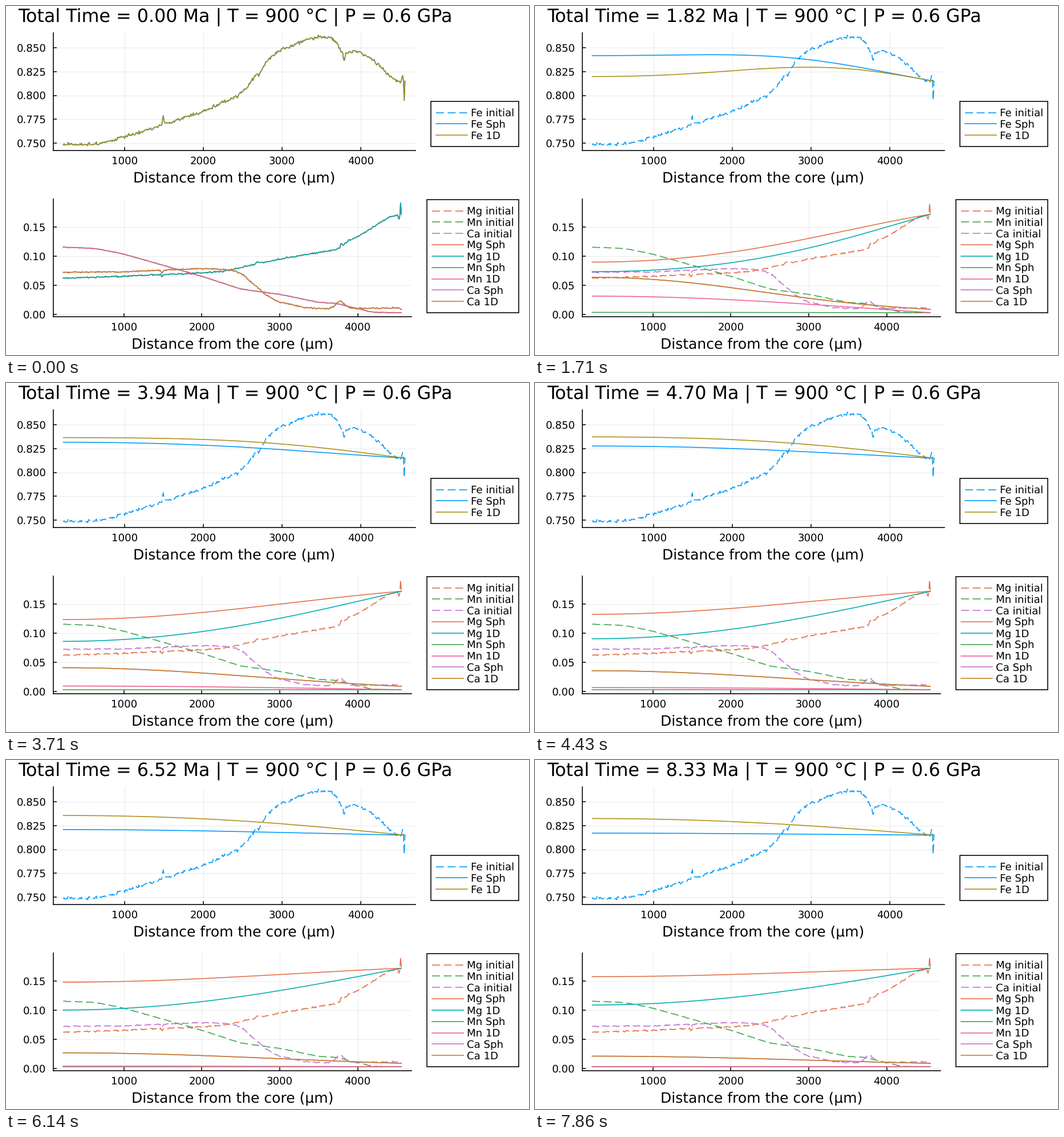
Recreate the animation shown at these times as a matplotlib script. Size 917x611 px, loop 8000 ms.

```python
import numpy as np
import matplotlib.pyplot as plt
from matplotlib.animation import FuncAnimation
from matplotlib.patches import Rectangle

plt.rcParams["text.hinting"] = "none"

W, H, DPI = 917, 611, 64
PX = 72 / DPI                      # points per pixel
STEPS, TICKS, LOOP = 56, 3, 8000   # model steps, ticks per step, ms
MA_PER_STEP = 15 / 99
LW = 1.6
DASH = (0, (14 / LW, 6.3 / LW))
UNIT = 2.269
SMALL, LABEL, TITLE = 8 * UNIT, 11 * UNIT, 14 * UNIT

BLUE, ORANGE, GREEN, PURPLE = "#009afa", "#e36f47", "#3ea44e", "#c371d2"
OCHRE, TEAL, PINK, BROWN = "#ac8e18", "#00aaae", "#ed5e93", "#c68225"

# ---- starting composition along the traverse (µm) ----
X0, X1 = 221, 4561


def trend(x, *keys):
    """Rounded polyline through a few (distance, fraction) keys."""
    return np.mean([np.interp(x + d, *zip(*keys))
                    for d in np.linspace(-60, 60, 9)], axis=0)


def bump(x, center, width, height):
    return height * np.exp(-((x - center) / width) ** 2 / 2)


def profile(x):
    """Columns Mg, Mn, Ca; Fe is the remainder to one."""
    mg = trend(x, (X0, .063), (1000, .066), (2000, .072), (2300, .075),
               (3000, .0955), (3760, .1125), (3860, .126), (4000, .1335),
               (4400, .1675), (X1, .172))
    mn = trend(x, (X0, .116), (650, .1135), (1000, .104), (2000, .066),
               (2500, .044), (3000, .035), (3500, .021), (3720, .0195),
               (4200, .004), (X1, .0034))
    ca = trend(x, (X0, .073), (1000, .0735), (2000, .0795), (2350, .077),
               (2500, .072), (2800, .0365), (2950, .0235), (3300, .0125),
               (3500, .0105), (X1, .0115))
    mg += (bump(x, 1491, 10, -.003) + bump(x, 2720, 25, .003)
           + bump(x, 3790, 10, .006) + bump(x, 4531, 8, -.0065)
           + bump(x, 4551, 4, .021))
    ca += (bump(x, 1491, 10, -.005) + bump(x, 3775, 55, .0125)
           + bump(x, X1, 15, -.0023))
    return np.column_stack([mg, mn, ca])


# ---- multicomponent diffusion in garnet, 900 °C and 0.6 GPa ----
RT = 8.314462 * 1173.15
P = 0.6e9


def diffusivity(d0, energy, volume):
    """cm²/s prefactor to mm²/Ma."""
    return d0 * np.exp(-(energy + volume * P) / RT) * 3.15576e15


D_MG = diffusivity(1.1e-3, 284516, 5.3e-6)
D_FE = diffusivity(6.4e-4, 275412, 5.6e-6)
D_MN = diffusivity(5.1e-4, 253443, 6.0e-6)
D = np.array([D_MG, D_MN, D_FE / 2])


def diffusion_matrix(c):
    mean = c @ D + (1 - c.sum(axis=1)) * D_FE
    return np.diag(D) - (D * c / mean[:, None])[:, :, None] * (D - D_FE)


def simulate(x, power, substeps=4):
    """Implicit finite volumes; power 0 is planar, 2 is spherical."""
    n = len(x)
    h = (x[1] - x[0]) / 1000
    faces = (np.arange(n - 1) + .5) * h
    edges = np.concatenate([[0], faces, [(n - 1) * h]])
    volume = np.diff(edges ** (power + 1)) / (power + 1)
    volume[-1] = 1e9               # keeps the rim composition fixed
    mass = np.repeat(volume * substeps / MA_PER_STEP, 3)
    area = (faces ** power)[:, None, None] / h
    i = np.arange(n - 1)
    diag = np.arange(3 * n)
    c = profile(x)
    states = [c]
    for _ in range(STEPS - 1):
        for _ in range(substeps):
            flux = area * diffusion_matrix((c[1:] + c[:-1]) / 2)
            k = np.zeros((n, 3, n, 3))
            k[i, :, i] += flux
            k[i, :, i + 1] -= flux
            k[i + 1, :, i + 1] += flux
            k[i + 1, :, i] -= flux
            m = k.reshape(3 * n, 3 * n)
            m[diag, diag] += mass
            c = np.linalg.solve(m, mass * c.ravel()).reshape(n, 3)
        states.append(c)
    return states


fine = np.linspace(X0, X1, 435)
grid = np.linspace(X0, X1, 131)
rng = np.random.default_rng(7)
noise = rng.normal(0, 1, (len(fine), 3)) * [.0007, .0002, .0006]
noise[-3:] = 0
start = profile(fine) + noise
sphere, planar = simulate(grid, 2), simulate(grid, 0)

# ---- drawing ----
fig = plt.figure(figsize=(W / DPI, H / DPI), dpi=DPI, facecolor="white")
page = fig.add_axes([0, 0, 1, 1], zorder=5)
page.set(xlim=(0, W), ylim=(H, 0))
page.axis("off")


def put(x, y, s, size, ha="left"):
    return page.text(x, y, s, fontsize=size * PX, ha=ha, va="baseline",
                     family="DejaVu Sans", color="black")


def panel(left, top, right, bottom, ylim, yticks, fmt):
    ax = fig.add_axes([left / W, 1 - bottom / H,
                       (right - left) / W, (bottom - top) / H])
    pad = .03 * (X1 - X0)
    xlim = (X0 - pad, X1 + pad)
    xticks = range(1000, 5000, 1000)
    ax.set(xlim=xlim, ylim=ylim, xticks=xticks, yticks=yticks)
    ax.patch.set_visible(False)
    ax.tick_params(direction="in", length=6 * PX, width=1.5 * PX,
                   labelbottom=False, labelleft=False)
    ax.grid(color="black", alpha=.1, lw=.8 * PX)
    ax.set_axisbelow(True)
    ax.spines[["top", "right"]].set_visible(False)
    ax.spines[["left", "bottom"]].set_linewidth(LW * PX)
    for v in xticks:
        px = left + (v - xlim[0]) / (xlim[1] - xlim[0]) * (right - left)
        put(px, bottom + 24.3, str(v), SMALL, "center")
    for v in yticks:
        py = bottom - (v - ylim[0]) / (ylim[1] - ylim[0]) * (bottom - top)
        put(70.5, py + 6.6, fmt % v, SMALL, "right")
    put((left + right) / 2, bottom + 55.8, "Distance from the core (µm)",
        LABEL, "center")
    return ax


def legend(left, top, right, bottom, entries):
    page.add_patch(Rectangle((left, top), right - left, bottom - top,
                             fc="white", ec="black", lw=LW * PX))
    for row, (name, color, style) in enumerate(entries):
        y = top + 20 + 19.85 * row
        page.plot([left + 9, left + 64], [y, y], color=color, ls=style,
                  lw=LW * PX)
        put(left + 70.3, y + 6.6, name, SMALL)


def add_lines(ax, entries):
    return {name: ax.plot([], [], color=color, ls=style, lw=LW * PX)[0]
            for name, color, style in entries}


upper = [("Fe initial", BLUE, DASH), ("Fe Sph", BLUE, "-"),
         ("Fe 1D", OCHRE, "-")]
lower = [("Mg initial", ORANGE, DASH), ("Mn initial", GREEN, DASH),
         ("Ca initial", PURPLE, DASH), ("Mg Sph", ORANGE, "-"),
         ("Mg 1D", TEAL, "-"), ("Mn Sph", GREEN, "-"), ("Mn 1D", PINK, "-"),
         ("Ca Sph", PURPLE, "-"), ("Ca 1D", BROWN, "-")]

fe_ax = panel(82.5, 47, 717.5, 252.5, (.7426, .8655),
              np.arange(.75, .86, .025), "%.3f")
minor_ax = panel(82.5, 338, 711, 543.5, (-.003, .1985),
                 np.arange(0, .16, .05), "%.2f")
legend(744.5, 166.5, 899, 245.5, upper)
legend(737.5, 338.5, 899, 536.5, lower)
lines = {**add_lines(fe_ax, upper), **add_lines(minor_ax, lower)}
title = put(21.5, 28, "", TITLE)


def fill(kind, x, c):
    values = {"Fe": 1 - c.sum(axis=1), "Mg": c[:, 0], "Mn": c[:, 1],
              "Ca": c[:, 2]}
    for element, y in values.items():
        lines[f"{element} {kind}"].set_data(x, y)


fill("initial", fine, start)


def update(tick):
    # a step appears one tick ahead of its nominal time
    k = min((tick + 1) // TICKS, STEPS - 1)
    x, sph, flat = (grid, sphere[k], planar[k]) if k else (fine, start, start)
    fill("Sph", x, sph)
    fill("1D", x, flat)
    # both calcium curves show the spherical solution
    lines["Ca 1D"].set_data(x, sph[:, 2])
    title.set_text(f"Total Time = {k * MA_PER_STEP:.2f} Ma"
                   " | T = 900 °C | P = 0.6 GPa")
    return [*lines.values(), title]


anim = FuncAnimation(fig, update, frames=STEPS * TICKS,
                     init_func=lambda: update(0),
                     interval=LOOP / (STEPS * TICKS), repeat=True, blit=False)
plt.show()
```
